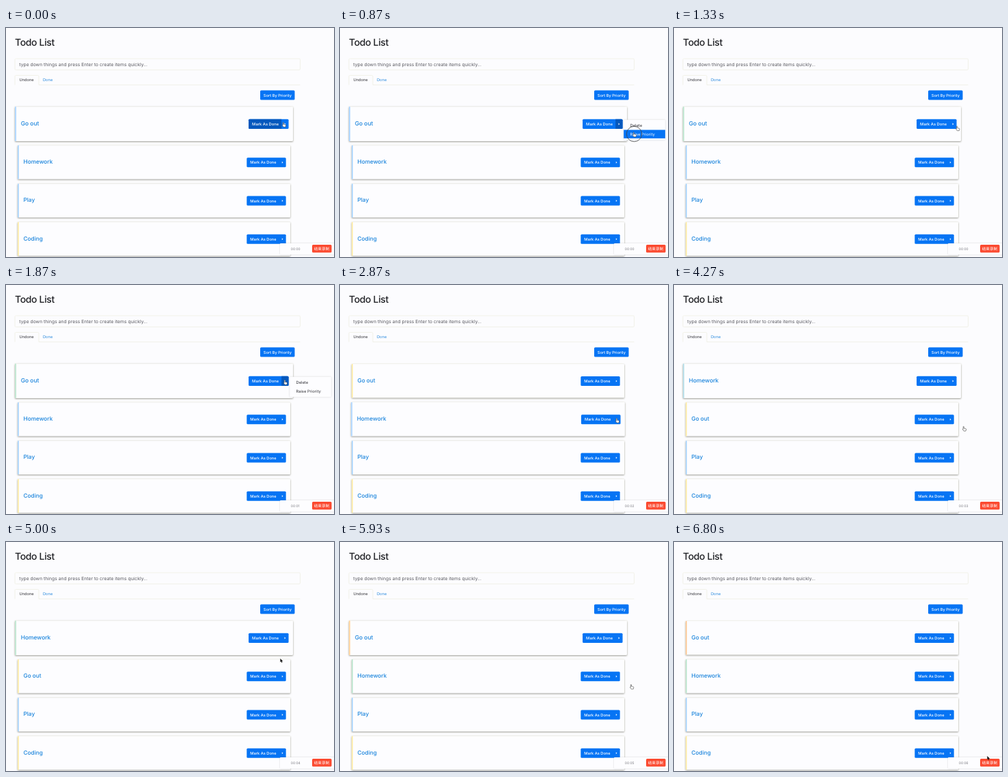
Animation, 480 px wide and 336 px high, one loop 6.87 s. Source, as an HTML page:

```html
<!DOCTYPE html>
<html lang="en">
<head>
<meta charset="utf-8">
<title>Todo List</title>
<style>
  html, body { margin: 0; width: 100%; height: 100%; overflow: hidden; background: #fcfcfe; }
  svg { display: block; width: 480px; height: 336px; font: 500 5.7px Inter, "Open Sans", sans-serif; text-rendering: geometricPrecision; }
  .line { fill: none; stroke: #efefe4; stroke-width: .8; }
  .card { fill: #fdfdff; filter: drop-shadow(0 1.2px .9px #5558) drop-shadow(0 .2px 1px #dcdcb466); }
  .box { fill: #fdfdff; filter: drop-shadow(0 .5px .9px #9996); }
  .blue { fill: #0674f4; }
  .dark { fill: #0558bd; }
  .white { fill: #fff; }
  .ink { fill: #333338; font-weight: 400; }
  .name { font-size: 8.25px; fill: #1a84dc; }
</style>
</head>
<body>
<svg viewBox="0 0 480 336">
  <text x="13" y="26" font-size="14" letter-spacing="-.35" fill="#1f2024">Todo List</text>
  <rect class="line" x="13" y="45" width="417.5" height="16.5" rx="1.5"/>
  <text class="ink" x="19.3" y="56" font-size="6.8" style="fill:#5a5a60">type down things and press Enter to create items quickly...</text>
  <path class="line" d="M13 83.5V71q0-1.5 1.5-1.5h32q1.5 0 1.5 1.5v12.5H430.5"/>
  <text class="ink" x="19.5" y="78.3">Undone</text>
  <text x="54" y="78.3" fill="#2a8ade" font-weight="400">Done</text>
  <rect class="blue" x="372" y="91.5" width="50.5" height="14" rx="1.5"/>
  <text class="white" x="376.8" y="100.7">Sort By Priority</text>
  <g id="cards"></g>
  <rect class="box" x="401" y="316" width="80" height="16.5" rx="1"/>
  <text id="clock" x="416.8" y="325.8" font-size="4.9" font-weight="400" fill="#77777c"></text>
  <rect x="448" y="318" width="28.5" height="11.5" rx="1.5" fill="#fb4a30"/>
  <text class="white" x="450.7" y="326" style="font-family:'Noto Sans CJK SC','Noto Sans CJK',sans-serif">结束录制</text>
  <circle id="ring" fill="none" stroke="#444" stroke-width=".8"/>
  <g id="cursor">
    <path id="hand" d="M-1.8-3.2q.6-.7 1.1 0V-.8L1.8-.3Q2.7-.1 2.6 1L2 3.2H-1L-2.7.8q0-1 .9-.3Z" fill="#fff" stroke="#444" stroke-width=".6"/>
    <path id="arrow" d="M-1.6-3V2.2L-.4 1.2.5 3.2 1.4 2.8.6.9H2.2Z" fill="#111"/>
  </g>
</svg>
<script>
const LOOP = 6870;
const $ = id => document.getElementById(id);
const clamp = v => Math.max(0, Math.min(1, v));
const ease = v => (v = clamp(v), v * v * (3 - 2 * v));
const within = (t, [a, b]) => t >= a && t < b;

// stripe colours from low to high priority
const levels = [[180, 217, 255], [196, 232, 212], [255, 238, 178], [255, 208, 164]];
// raise: times at which the priority goes up one level
const items = [
  { name: 'Go out', level: 0, hover: [[-400, 2530], [5180, 6350]],
    menus: [[380, 950], [1650, 2450], [5330, 5760]], raise: [950, 2450, 5760] },
  { name: 'Homework', level: 0, hover: [[2780, 5130]], menus: [[3200, 4150]], raise: [4150] },
  { name: 'Play', level: 0, hover: [], menus: [], raise: [] },
  { name: 'Coding', level: 2, hover: [], menus: [], raise: [] }
];
const swapped = [4150, 5760];
const clicks = [330, 700, 1590, 2300, 3150, 3930, 5280, 5640];
// time, x, y
const path = [
  [0, 407, 142], [420, 408, 142], [680, 431, 156], [1050, 431, 157],
  [1500, 408, 143], [1930, 409, 143], [2200, 431, 156], [2480, 431, 158],
  [2820, 406, 199], [3250, 406, 199], [3700, 425, 211], [4280, 425, 211],
  [4400, 412, 200], [4750, 403, 174], [5080, 403, 174], [5250, 406, 199],
  [5340, 406, 199], [5560, 427, 212], [5900, 427, 212], [6600, 460, 317],
  [LOOP, 460, 317]
];

$('cards').innerHTML = items.map(({ name }) => `<g>
  <rect class="card" x="17" y="-25" width="399" height="49.5" rx="1"/>
  <rect class="stripe" x="17" y="-25" width="2" height="49.5"/>
  <text class="name" x="25.5" y="1.8">${name}</text>
  <rect class="blue" x="352.3" y="-7" width="57.4" height="14" rx="1.5"/>
  <path class="main dark" d="M353.8-7H399.5V7H353.8q-1.5 0-1.5-1.5V-5.5q0-1.5 1.5-1.5Z"/>
  <path class="more dark" d="M399.5-7H408.2q1.5 0 1.5 1.5V5.5q0 1.5-1.5 1.5H399.5Z"/>
  <text class="white" x="357.3" y="2.2">Mark As Done</text>
  <path class="white" d="M403.8-1.5L405.5 0 403.8 1.5Z"/>
  <g class="menu">
    <rect class="box" x="411.3" y="-6" width="59.5" height="29" rx="1"/>
    <rect class="pick blue" x="411.3" width="59.5" height="12.2"/>
    <text class="ink" x="420.4" y="4.3">Delete</text>
    <text class="ink" x="420.4" y="16.6">Raise Priority</text>
  </g>
</g>`).join('');
const groups = [...$('cards').children];
const show = (el, on) => el.style.display = on ? '' : 'none';

function cursorAt(t) {
  const i = path.findIndex(p => p[0] > t);
  const [t0, x0, y0] = path[i - 1], [t1, x1, y1] = path[i];
  const k = ease((t - t0) / (t1 - t0));
  return [x0 + (x1 - x0) * k, y0 + (y1 - y0) * k];
}

function stripeColor({ level, raise }, t) {
  const now = raise.reduce((sum, at) => sum + clamp((t - at) / 250), level);
  const from = Math.floor(now), to = Math.ceil(now);
  return `rgb(${levels[from].map((c, i) => c + (levels[to][i] - c) * (now - from))})`;
}

function drawCard(item, i, t, x, y) {
  const g = groups[i], part = name => g.querySelector('.' + name);
  const row = i < 2 && within(t, swapped) ? 1 - i : i;
  const cy = 140.9 + 56.3 * row;
  const grow = item.hover.reduce((sum, [a, b]) => sum + ease((t - a) / 300) - ease((t - b) / 300), 0);
  g.setAttribute('transform', `translate(216.5 ${cy}) scale(${1 + .02 * grow}) translate(-216.5 0)`);
  part('stripe').style.fill = stripeColor(item, t);
  part('main').style.opacity = i ? 0 : 1 - clamp((t - 30) / 150);
  const open = item.menus.some(m => within(t, m));
  show(part('more'), open);
  show(part('menu'), open);
  const choice = x < 416 ? -1 : y > cy + 8 ? 1 : 0;
  show(part('pick'), choice >= 0);
  part('pick').setAttribute('y', choice > 0 ? 8.4 : -4);
  g.querySelectorAll('.menu text').forEach((el, n) => el.style.fill = n === choice ? '#fff' : '');
}

function draw(now) {
  const t = now % LOOP;
  const [x, y] = cursorAt(t);
  items.forEach((item, i) => drawCard(item, i, t, x, y));
  $('clock').textContent = '00:0' + Math.max(0, Math.floor((t - 370) / 1000));

  const hand = t < 4440 || within(t, [5180, 5960]);
  show($('hand'), hand);
  show($('arrow'), !hand);
  $('cursor').setAttribute('transform', `translate(${x} ${y})`);

  const click = clicks.find(c => within(t, [c, c + 250]));
  show($('ring'), click !== undefined);
  if (click !== undefined) {
    $('ring').setAttribute('cx', x - .5);
    $('ring').setAttribute('cy', y - 1);
    $('ring').setAttribute('r', 3 + 12 * (t - click) / 250);
  }
  requestAnimationFrame(draw);
}
draw(performance.now());
</script>
</body>
</html>
```
